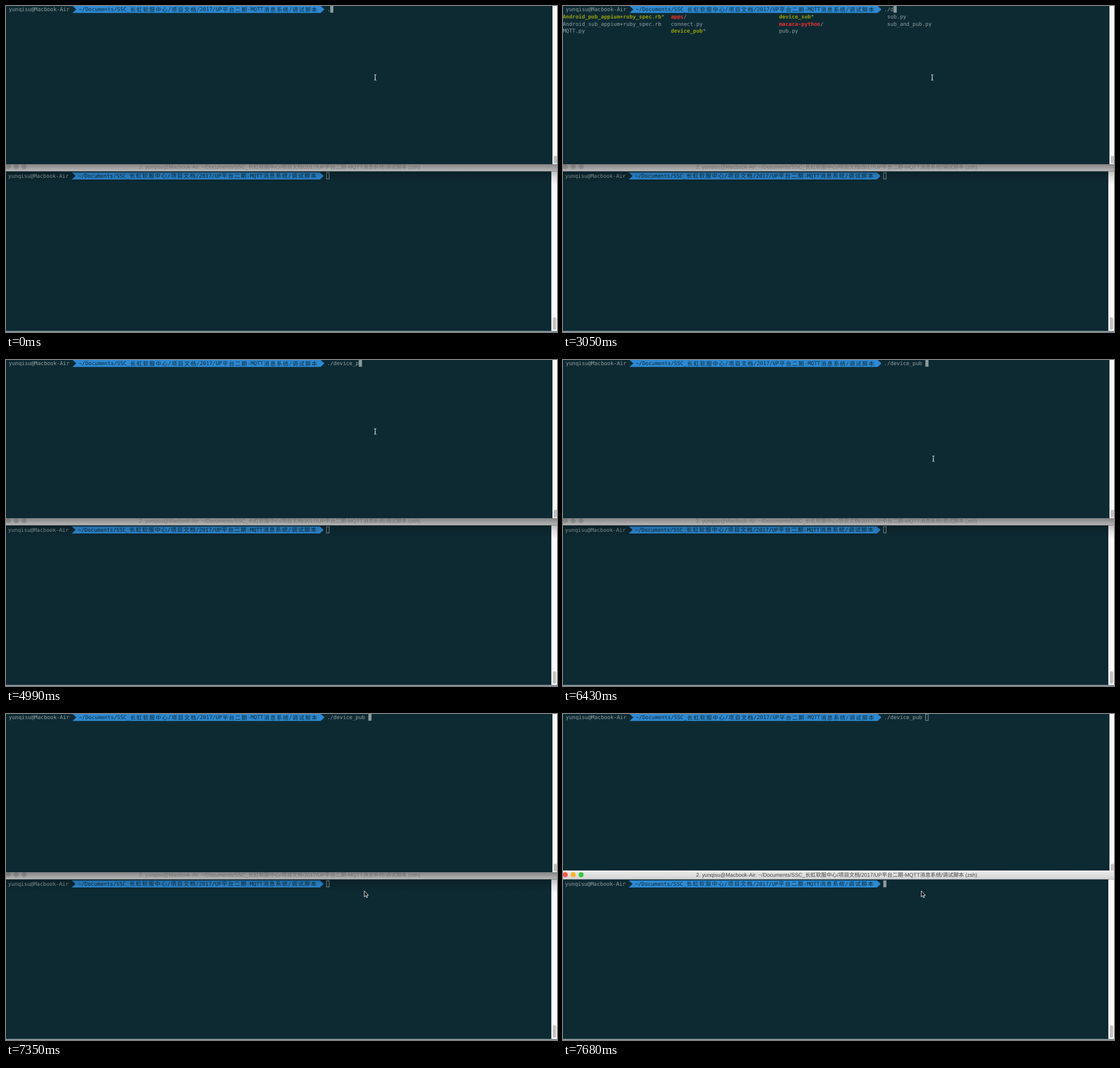
An HTML page that plays this animation: 973 by 575 pixels, repeating every 8 s.

```html
<!DOCTYPE html>
<html lang="zh-CN">
<head>
<meta charset="utf-8">
<title>Terminal</title>
<style>
  html, body { margin: 0; width: 100%; height: 100%; overflow: hidden; background: #0d2a33; }
  svg { display: block; width: 973px; height: 575px; }
  text { white-space: pre; text-rendering: geometricPrecision; }
  .mono { font: 9.33px "DejaVu Sans Mono", "Noto Sans CJK SC", monospace; fill: #93a1a1; }
  .wide { font: 9.8px "Noto Sans CJK SC", "Noto Sans CJK", sans-serif; letter-spacing: 1.44px; }
  .dark { fill: #0d2a33; }
  .exec { fill: #97a00c; font-weight: bold; }
  .dir { fill: #f0322f; font-weight: bold; }
  .title { font: 9.38px "Liberation Sans", "Noto Sans CJK SC", "Noto Sans CJK", sans-serif; }
</style>
</head>
<body>
<svg id="stage" viewBox="0 0 973 575">
  <defs>
    <linearGradient id="bar" x2="0" y2="1">
      <stop stop-color="#ececec"/><stop offset="1" stop-color="#d3d3d3"/>
    </linearGradient>
    <linearGradient id="shade" x2="0" y2="1">
      <stop stop-opacity=".45"/><stop offset=".33" stop-opacity=".24"/>
      <stop offset=".6" stop-opacity=".11"/><stop offset="1" stop-opacity="0"/>
    </linearGradient>
  </defs>
</svg>
<script>
const CELL = 5.617, ROW = 12.6, LOOP = 8000;
const USER = 'yunqisu@Macbook-Air';
const PATH = '~/Documents/SSC_长虹软服中心/项目文档/2017/UP平台二期-MQTT消息系统/调试脚本';
const PROMPT_END = 101;
const stage = document.getElementById('stage');

function add(parent, tag, attrs = {}, content = '') {
  const node = document.createElementNS('http://www.w3.org/2000/svg', tag);
  for (const key in attrs) node.setAttribute(key, attrs[key]);
  node.textContent = content;
  return parent.appendChild(node);
}

const rect = (parent, x, y, width, height, fill, more) =>
  add(parent, 'rect', { x, y, width, height, fill, ...more });

// Places text on the character grid; CJK characters take two cells.
function print(win, col, row, str, style = '') {
  for (const run of str.match(/[\u4e00-\u9fff]+|[^\u4e00-\u9fff]+/g) || []) {
    const wide = run.charCodeAt(0) > 0x4dff;
    add(win.g, 'text', {
      x: win.x + col * CELL + (wide ? .7 : 0),
      y: win.y + row * ROW + (wide ? 9.8 : 9.5),
      class: `mono ${style} ${wide ? 'wide' : ''}`
    }, run);
    col += run.length * (wide ? 2 : 1);
  }
}

function terminal(x, y, top, bottom, right) {
  const win = { g: add(stage, 'g'), x, y };
  rect(win.g, 0, top, 973, bottom - top, '#0d2a33');
  rect(win.g, right, top, 973 - right, bottom - top, '#fafafa');
  const at = col => x + col * CELL, mid = y + 6.2, low = y + 12.4;
  add(win.g, 'path', {
    d: `M${at(21)} ${y}H${at(99)}L${at(100.2)} ${mid}L${at(99)} ${low}H${at(21)}L${at(22.2)} ${mid}Z`,
    fill: '#2d89d3'
  });
  print(win, 1, 0, USER);
  print(win, 23, 0, PATH, 'dark');
  win.cursor = rect(win.g, 0, y, CELL, 12, '#93a1a1');
  return win;
}

function setCursor(win, col, solid) {
  const inset = solid ? 0 : .5;
  const attrs = {
    x: win.x + col * CELL + inset, y: win.y + inset,
    width: CELL - 2 * inset, height: 12 - 2 * inset,
    fill: solid ? '#8b9a9c' : 'none', stroke: solid ? 'none' : '#93a1a1'
  };
  for (const key in attrs) win.cursor.setAttribute(key, attrs[key]);
}

const show = (node, on) => node.setAttribute('visibility', on ? 'visible' : 'hidden');

// Lower window
const lower = terminal(-1.8, 293.5, 276, 573, 963);
rect(lower.g, 965.5, 549, 6, 22, '#c2c2c2', { rx: 3 });
rect(lower.g, 0, 573, 973, 2, '#87939a');
const bar = rect(lower.g, 0, 276, 973, 15.5);
rect(lower.g, 0, 291, 973, .8, '#9c9c9c');
const lights = ['#fc5650', '#f6b42c', '#36c748'].map((color, i) =>
  ({ color, node: add(lower.g, 'circle', { cx: 4 + 14 * i, cy: 283.5, r: 4.5 }) }));
const title = add(lower.g, 'text', { x: 235, y: 287, class: 'title' }, `2. ${USER}: ${PATH} (zsh)`);

// Upper window with its shadow
const upper = terminal(-.5, -.2, 0, 279, 965);
rect(upper.g, 967, 264, 6, 14, '#c2c2c2', { rx: 3 });
const shadow = rect(upper.g, 0, 279, 973, 37, 'url(#shade)');
const command = add(upper.g, 'text', { x: upper.x + PROMPT_END * CELL, y: upper.y + 9.5, class: 'mono' });

const listing = { ...upper, g: add(upper.g, 'g') };
[
  ['Android_pub_appium+ruby_spec.rb*', 'apps/', 'device_sub*', 'sub.py'],
  ['Android_sub_appium+ruby_spec.rb', 'connect.py', 'macaca-python/', 'sub_and_pub.py'],
  ['MQTT.py', 'device_pub*', 'pub.py']
].forEach((names, row) => names.forEach((name, i) => {
  const mark = /[*\/]$/.test(name) ? name.slice(-1) : '';
  const base = mark ? name.slice(0, -1) : name;
  print(listing, i * 34, row + 1, base, { '*': 'exec', '/': 'dir' }[mark]);
  print(listing, i * 34 + base.length, row + 1, mark);
}));

// Mouse pointers, drawn around their hot spots
const beam = add(stage, 'path', {
  d: 'M-2 -5Q0 -5 0 -3.5Q0 -5 2 -5M0 -4V4M-2 5Q0 5 0 3.5Q0 5 2 5M-1 1H1',
  fill: 'none', stroke: '#e4e8e9', 'stroke-width': 1
});
const arrow = add(stage, 'path', {
  d: 'M0 0V10.5L2.4 8.3L4 12L5.7 11.2L4.1 7.7H7.3Z',
  fill: '#080808', stroke: '#fff', 'stroke-width': .9, 'stroke-linejoin': 'round'
});

const typing = [
  [0, '.'], [110, './'], [3050, './d'], [3260, './de'], [3440, './device_'],
  [4990, './device_p'], [5170, './device_pu'], [5710, './device_pub ']
];
const mouse = [
  [0, 652, 126], [6430, 654, 174], [6490, 660, 192], [6550, 672, 214],
  [6610, 688, 236], [6680, 703, 254], [6740, 708, 270], [6800, 706, 286],
  [6860, 696, 297], [6920, 679, 305], [6990, 657, 309], [7050, 643, 310],
  [7230, 640, 310], [7290, 636, 311], [7350, 632.7, 312]
];
const latest = (steps, t) => steps.filter(step => step[0] <= t).pop();

let wasRaised;
function raise(raised) {
  if (raised === wasRaised) return;
  wasRaised = raised;
  stage.insertBefore(raised ? upper.g : lower.g, raised ? lower.g : upper.g);
  show(shadow, !raised);
  bar.setAttribute('fill', raised ? 'url(#bar)' : '#f0f0f0');
  title.setAttribute('fill', raised ? '#444' : '#b0b0b0');
  lights.forEach(({ node, color }) => node.setAttribute('fill', raised ? color : '#cfcfcf'));
}

function render(t) {
  const text = latest(typing, t)[1];
  command.textContent = text;
  show(listing.g, t >= 650 && t < 3440);

  raise(t >= 7590);
  const lowerActive = t >= 7680;
  setCursor(upper, PROMPT_END + text.length, !lowerActive);
  setCursor(lower, PROMPT_END, lowerActive);

  const [, x, y] = latest(mouse, t);
  const pointer = y > 279 ? arrow : beam;
  pointer.setAttribute('transform', `translate(${x} ${y})`);
  show(beam, pointer === beam);
  show(arrow, pointer === arrow);
}

const start = performance.now();
function tick() {
  render((performance.now() - start) % LOOP);
  requestAnimationFrame(tick);
}
tick();
</script>
</body>
</html>
```
